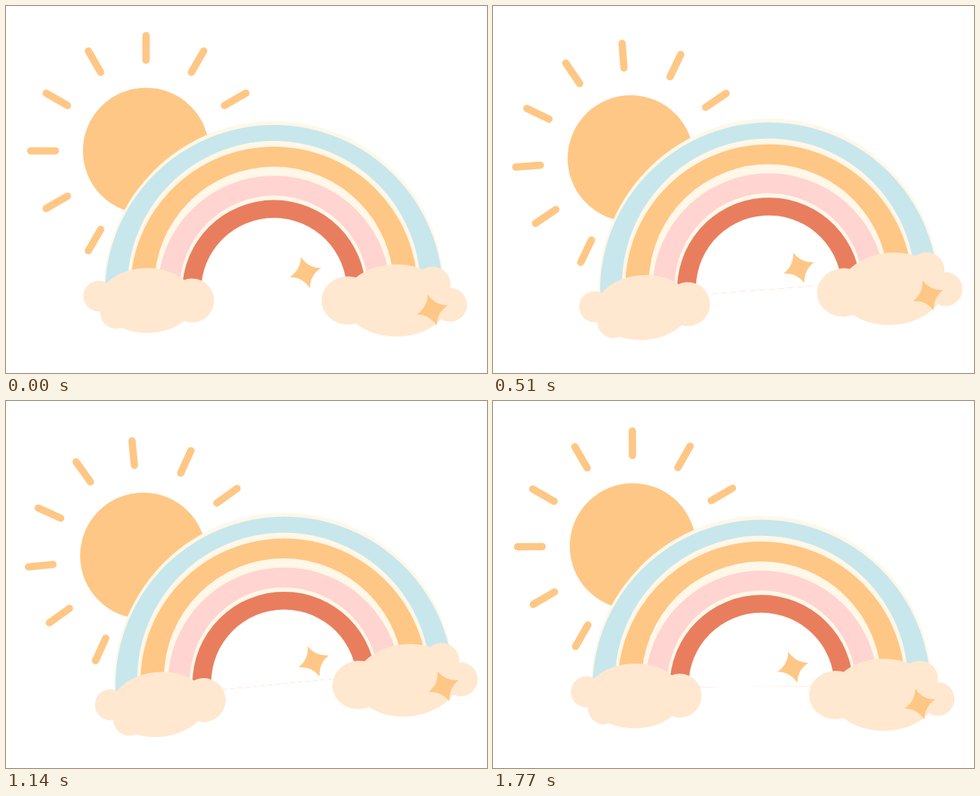
Write an HTML page that moves like this. It is 663x506 px and loops after 1.8 s.

```html
<!DOCTYPE html>
<html>
<head>
<meta charset="utf-8">
<style>
  html, body { margin: 0; width: 100%; height: 100%; overflow: hidden; background: #fff; }
  svg { display: block; }
</style>
</head>
<body>
<svg width="663" height="506" viewBox="0 0 663 506">
  <defs>
    <clipPath id="arch"><rect width="663" height="394"/></clipPath>
    <path id="star" fill="#ffc785" d="M0-22.3Q5.3-5.3 22.3 0Q5.3 5.3 0 22.3Q-5.3 5.3-22.3 0Q-5.3-5.3 0-22.3Z"/>
  </defs>
  <g id="scene">
    <g id="sun" transform="translate(193 199.7)" stroke="#ffc785" stroke-width="10" stroke-linecap="round">
      <circle r="87" fill="#ffc785" stroke="none"/>
    </g>
    <g id="bands" clip-path="url(#arch)"></g>
    <g fill="#ffe8cf">
      <circle cx="128" cy="400" r="21.3"/>
      <circle cx="152" cy="423" r="22"/>
      <ellipse cx="194.5" cy="406" rx="66" ry="44.7"/>
      <circle cx="256.5" cy="406" r="30.3"/>
      <ellipse cx="471.5" cy="406" rx="36.5" ry="33.3"/>
      <ellipse cx="538" cy="406" rx="72" ry="49.7"/>
      <circle cx="588" cy="384" r="24.7"/>
      <circle cx="612" cy="412" r="23.3"/>
    </g>
    <use href="#star" transform="translate(412.7 367.5) rotate(-16)"/>
    <use href="#star" transform="translate(587.5 419) rotate(-16)"/>
  </g>
</svg>
<script>
const $ = id => document.getElementById(id);

function add(parent, tag, attrs) {
  const el = document.createElementNS('http://www.w3.org/2000/svg', tag);
  for (const key in attrs) el.setAttribute(key, attrs[key]);
  parent.append(el);
}

for (let a = 0; a < 360; a += 30)
  add($('sun'), 'line', { x1: 125, x2: 159, transform: `rotate(${a})` });

// Nested discs, outside in: colour, top edge, radius
const cream = '#fff7e8';
[
  [cream, 158.7, 234.5], ['#c7e7ec', 164, 233],
  [cream, 186, 202], ['#ffc785', 194, 198],
  [cream, 221.5, 165], ['#ffd4d1', 234, 160.5],
  [cream, 261.5, 130], ['#e97e5f', 267.5, 126.5],
  [cream, 292, 100.5], ['#fff', 293, 99.5]
].forEach(([fill, top, r]) => add($('bands'), 'circle', { cx: 369.3, cy: top + r, r, fill }));

const LOOP = 1800, STEP = 30, TILT = 7.6;

function draw() {
  const t = Math.floor(performance.now() % LOOP / STEP) * STEP;
  const swing = 1 - Math.abs(1 - 2 * t / LOOP);
  $('scene').setAttribute('transform', `rotate(${-TILT * swing} 330 246)`);
  requestAnimationFrame(draw);
}
draw();
</script>
</body>
</html>
```
